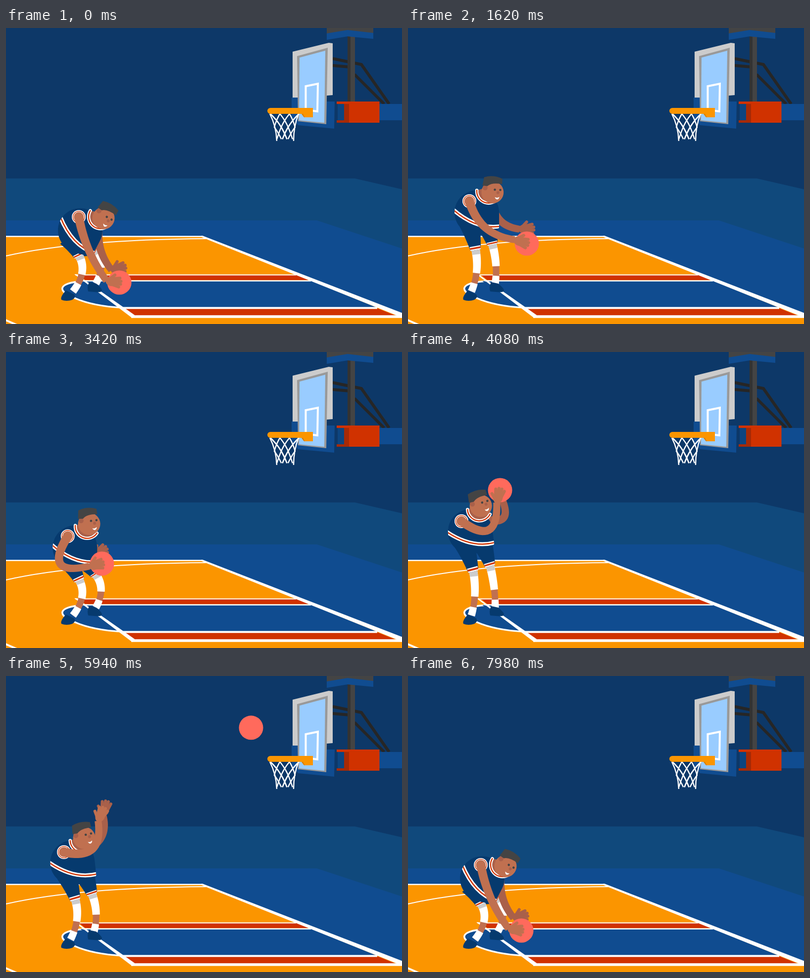
Recreate the animation shown at these times as an HTML page with a canvas. Size 800 by 600 pixels, loop 8040 ms.

```html
<!DOCTYPE html>
<html lang="en">
<head>
<meta charset="utf-8">
<title>Free throw practice</title>
<style>
html, body { margin: 0; width: 100%; height: 100%; overflow: hidden; background: #0d3868 }
canvas { display: block }
</style>
</head>
<body>
<canvas id="stage" width="800" height="600"></canvas>
<script>
const ctx = document.getElementById('stage').getContext('2d');
const LOOP = 8040, STEP = 60, GRAVITY = 1924e-6, FLOOR = 517;
const NAVY = '#063a6e', BLUE = '#104c90', ORANGE = '#fb9500', RED = '#d03200',
      SKIN = '#c07050', SHADE = '#a9604a', HAIR = '#444', BALL = '#ff6a5c';

function fill(color, d) {
  ctx.fillStyle = color;
  ctx.fill(new Path2D(d));
}
function line(color, width, d) {
  ctx.strokeStyle = color;
  ctx.lineWidth = width;
  ctx.stroke(new Path2D(d));
}
function disc(color, x, y, rx, ry = rx) {
  ctx.fillStyle = color;
  ctx.beginPath();
  ctx.ellipse(x, y, rx, ry, 0, 0, 7);
  ctx.fill();
}
function within(x, y, degrees, draw) {
  ctx.save();
  ctx.translate(x, y);
  ctx.rotate(degrees * Math.PI / 180);
  draw();
  ctx.restore();
}

const mix = (a, b, p) => a + (b - a) * p;
const clamp = p => Math.min(1, Math.max(0, p));
const smooth = p => p * p * (3 - 2 * p);
const polar = (r, degrees) => [r * Math.cos(degrees * Math.PI / 180), r * Math.sin(degrees * Math.PI / 180)];

// Tapered band along part of a quadratic curve.
function limb([p, c, q], w0, w1, color, from = 0, to = 1) {
  const left = [], right = [], n = 20;
  for (let i = 0; i <= n; i++) {
    const t = mix(from, to, i / n), u = 1 - t;
    const [x, y] = [0, 1].map(k => u * u * p[k] + 2 * u * t * c[k] + t * t * q[k]);
    const [dx, dy] = [0, 1].map(k => u * (c[k] - p[k]) + t * (q[k] - c[k]));
    const s = mix(w0, w1, i / n) / 2 / (Math.hypot(dx, dy) || 1);
    left.push([x - dy * s, y + dx * s]);
    right.unshift([x + dy * s, y - dx * s]);
  }
  fill(color, 'M' + left.concat(right).join('L') + 'Z');
}

function drawCourt() {
  const circle = 'M165 513C112 514 94 530 140 548C165 559 200 565 235 567';
  fill('#0d3868', 'M0 0H800V600H0Z');
  fill('#10497c', 'M0 305H705L800 327V600H0Z');
  fill(BLUE, 'M0 390H628L800 447V600H0Z');
  fill(ORANGE, 'M0 422H395L800 581V600H0Z');
  line('#fff', 2.5, 'M0 422.5H397');
  line('#fff', 2, 'M0 462C110 437 260 428 405 427');
  fill(BLUE, circle);
  line('#fff', 3.5, circle);
  fill(BLUE, 'M150 513H618L750 567H235Z');
  fill(RED, 'M148 501H588L612 511H160Z');
  line('#fff', 2, 'M140 500.5H586');
  line('#fff', 2.5, 'M155 512.5H616');
  fill(RED, 'M240 568H750L790 584H258Z');
  line('#fff', 4, 'M232 567.5H750');
  line('#fff', 5.5, 'M253 585H800');
  fill('#fff', 'M138 499H142L260 582L255 588Z');
  fill('#fff', 'M394 421H397L800 577.5V587L395 424Z');
  line('#fff', 4, 'M-3 591L22 602');
}

function drawNet() {
  const reflect = u => u > 1 ? 2 - u : u < -1 ? -2 - u : u;
  for (let i = 0; i < 4; i++) for (const way of [-1, 1]) {
    const path = [];
    for (let v = 0; v <= 1.001; v += .05) {
      const u = reflect(-1 + i / 1.5 + way * v * 4 / 3);
      path.push([563 + u * (17 + 12 * (1 - v) ** 1.6), mix(174, 228, v)]);
    }
    line('#fff', 2.4, 'M' + path.join('L'));
  }
  line('#fff', 2.4, 'M533 174Q546 199 547 229M591 174Q581 199 581 229');
}

function drawHoop() {
  line('#262626', 6, 'M660 62L718 74L774 154M660 76L694 79M704 94L764 154');
  fill(HAIR, 'M690 15H705V150H690Z');
  fill('#333', 'M690 15H696V150H690Z');
  fill(HAIR, 'M648 0H742V11L690 5L648 12Z');
  fill(BLUE, 'M648 11L690 4L742 10V22L690 17L648 24Z');
  fill(BLUE, 'M754 154H800V187H754Z');
  fill('#0d4580', 'M670 153H684V188H670Z');
  fill('#a62a06', 'M668 149H693V192H668V187H683V154H668Z');
  fill(RED, 'M668 149H754.5V192H693V154H668Z');
  fill(BLUE, 'M577 141H648V149H664L663 204L590 197L577 180Z');
  fill('#ccc', 'M579 48L652 30L660 31V136L648 137L590 141H579Z');
  fill('#999', 'M588 57L650 40L647 195L590 189Z');
  fill('#9cf', 'M593 60L645 46L643 192L592 187Z');
  line('#fff', 4, 'M605.5 118L630 113L629 169L605.5 166Z');
  drawNet();
  fill('#d98000', 'M596 173H606L608 181H602Z');
  fill(ORANGE, 'M534 162H620V181H604L600 174H534A6 6 0 0 1 534 162Z');
}

// Shoulder x, y, body lean, head tilt, grip x, y, hand angle; everything else follows from these.
const crouch = [147, 383, 27, 35, 229, 516, 8],
      dribble = [124, 351, 0, 8, 240, 437, 18],
      stand = [124, 334, -4, 3, 225, 405, 10],
      back = [106, 348, -4, 4, 222, 415, 5],
      hold = [125, 374, 1, -2, 194, 432, -10],
      aim = [108, 343, -7, -12, 186, 280, -75],
      follow = [117, 357, -6, -8, 197, 270, -65],
      wait = [117, 354, -6, 7, 186, 415, -12];

const cues = [[120, 660, stand], [660, 900, dribble], [900, 1220, back], [1220, 1600, dribble],
  [1680, 2300, hold], [3360, 4080, aim], [4600, 4860, follow], [6300, 6800, wait], [7050, 7560, crouch]];

function poseAt(t) {
  return cues.reduce((pose, [from, to, next]) => {
    const p = smooth(clamp((t - from) / (to - from)));
    return pose.map((v, i) => mix(v, next[i], p));
  }, crouch);
}

// Points (time, x, y) joined by free flight: two dribbles, then the shot off board, rim and floor.
const throws = [
  [[900, 240, 437], [1220, 246, FLOOR], [1600, 240, 437]],
  [[1680, 240, 437], [1980, 228, FLOOR], [2300, 194, 432]],
  [[4860, 197, 270], [5550, 620, 57], [5810, 522, 145], [6697, 338, FLOOR], [7020, 277, FLOOR]]
];

function ballAt(t, grip) {
  for (const points of throws) {
    const i = points.findIndex(p => p[0] > t);
    if (i < 1) continue;
    const [t0, x0, y0] = points[i - 1], [t1, x1, y1] = points[i];
    const p = (t - t0) / (t1 - t0);
    return [mix(x0, x1, p), mix(y0, y1, p) - GRAVITY / 2 * (t - t0) * (t1 - t)];
  }
  if (t >= 7020 && t < 7560) return [mix(277, 229, smooth(clamp((t - 7020) / 420))), FLOOR - 1];
  return grip;
}

function drawLeg(hip, knee, bend, ankle) {
  const shin = [knee, bend, ankle];
  const thigh = [hip, [mix(hip[0], knee[0], .55), mix(hip[1], knee[1], .45)], knee];
  limb(shin, 15, 12, SKIN);
  limb(shin, 17, 15, '#fff', 0, .54);
  limb(shin, 17, 16, '#ccc', 0, .1);
  limb(shin, 14, 15, '#fff', .79, 1);
  limb(thigh, 42, 21, NAVY);
  limb(thigh, 22, 21, '#fff', .86, 1);
  limb(thigh, 22, 21, RED, .9, .96);
}

// The shorter the reach, the further the elbow bows out.
function drawArm([sx, sy], [x, y], length, angle, color, width) {
  const dx = x - sx, dy = y - sy, reach = Math.hypot(dx, dy);
  const bow = Math.max(0, 1.1 * (length - reach)) / reach;
  limb([[sx, sy], [(sx + x) / 2 - dy * bow, (sy + y) / 2 + dx * bow], [x, y]], width, 14, color);
  within(x, y, angle, () => {
    disc(color, 10, 0, 12, 9.5);
    for (let i = 0; i < 4; i++)
      line(color, 6, `M12 ${-6 + 4 * i}L${i % 3 ? 29 : 26} ${-9 + 6 * i}`);
    line(color, 6, 'M6 -5L15 -14');
  });
}

function drawTorso() {
  const hem = 'M-33 17Q14 58 62 51', collar = 'M59 -7A24 24 0 0 1 15 -22';
  const body = new Path2D('M60 23V54Q45 68 15 68A45 45 0 1 1 60 23Z');
  ctx.fillStyle = NAVY;
  ctx.fill(body);
  ctx.save();
  ctx.clip(body);
  line('#fff', 8, hem);
  line(RED, 2.5, hem);
  ctx.restore();
  fill(SHADE, collar + 'L45 -30Z');
  line('#fff', 6.5, collar);
  line(RED, 2.3, collar);
}

function drawHead() {
  disc(SKIN, 0, 0, 22.5);
  disc(SHADE, -16, -7, 5);
  fill(HAIR, 'M-22 -11L-21 -28Q-3 -36 16 -30L17 -19Q-4 -20 -12 -11Z');
  disc(HAIR, 4, -6, 2.3);
  disc(HAIR, 15, -7, 2.3);
  disc(SHADE, 11, -1, 3);
  fill('#fff', 'M6 9Q11 11 15 7Q15 12 11 13Q8 13 6 9Z');
}

function drawPlayer(t) {
  const [x, y, lean, tilt, gx, gy, angle] = poseAt(t);
  const local = (lx, ly) => {
    const [c, s] = polar(1, lean);
    return [x + lx * c - ly * s, y + lx * s + ly * c];
  };
  const kneeY = Math.min(463, 445 + (y - 343) * .65), kneeX = 132 + (kneeY - 445) * .9;
  const flex = Math.max(0, kneeY - 450) * .7;
  const [hx, hy] = polar(50, tilt * .88 - 28);
  const [wx, wy] = polar(26, angle);
  const wrist = [gx - wx, gy - wy], raised = polar(18, angle)[0];

  drawLeg(local(36, 49), [kneeX + 34, kneeY - 11], [kneeX + 45 + flex, 481], [176 + flex * .6, 518]);
  fill(NAVY, 'M168 515L182 518Q192 526 194 531Q194 536 184 535.5L166 534Q163 525 168 515Z');
  drawLeg(local(1, 47), [kneeX, kneeY], [kneeX + 8 + flex, 495], [128 + flex * .8, 534]);
  fill(NAVY, 'M121 532L138 540Q142 546 134 551Q122 555 112 551Q109 545 121 532Z');

  drawArm(local(45, 0), [wrist[0] + 10, wrist[1] - 4 - raised], 108, angle - 1.2 * raised, SHADE, 17);
  within(x, y, lean, drawTorso);
  within(x + hx, y + hy, tilt, drawHead);
  disc(BALL, ...ballAt(t, [gx, gy]), 24.5);
  disc('#fff', x, y, 14);
  disc(RED, x, y, 12.3);
  disc('#fff', x, y, 11);
  disc(SKIN, x, y, 10);
  drawArm([x, y], wrist, 156, angle, SKIN, 18);
}

const start = performance.now();
function frame() {
  const t = Math.floor((performance.now() - start) % LOOP / STEP) * STEP;
  ctx.lineCap = 'butt';
  drawCourt();
  drawHoop();
  ctx.lineCap = 'round';
  drawPlayer(t);
  requestAnimationFrame(frame);
}
frame();
</script>
</body>
</html>
```
